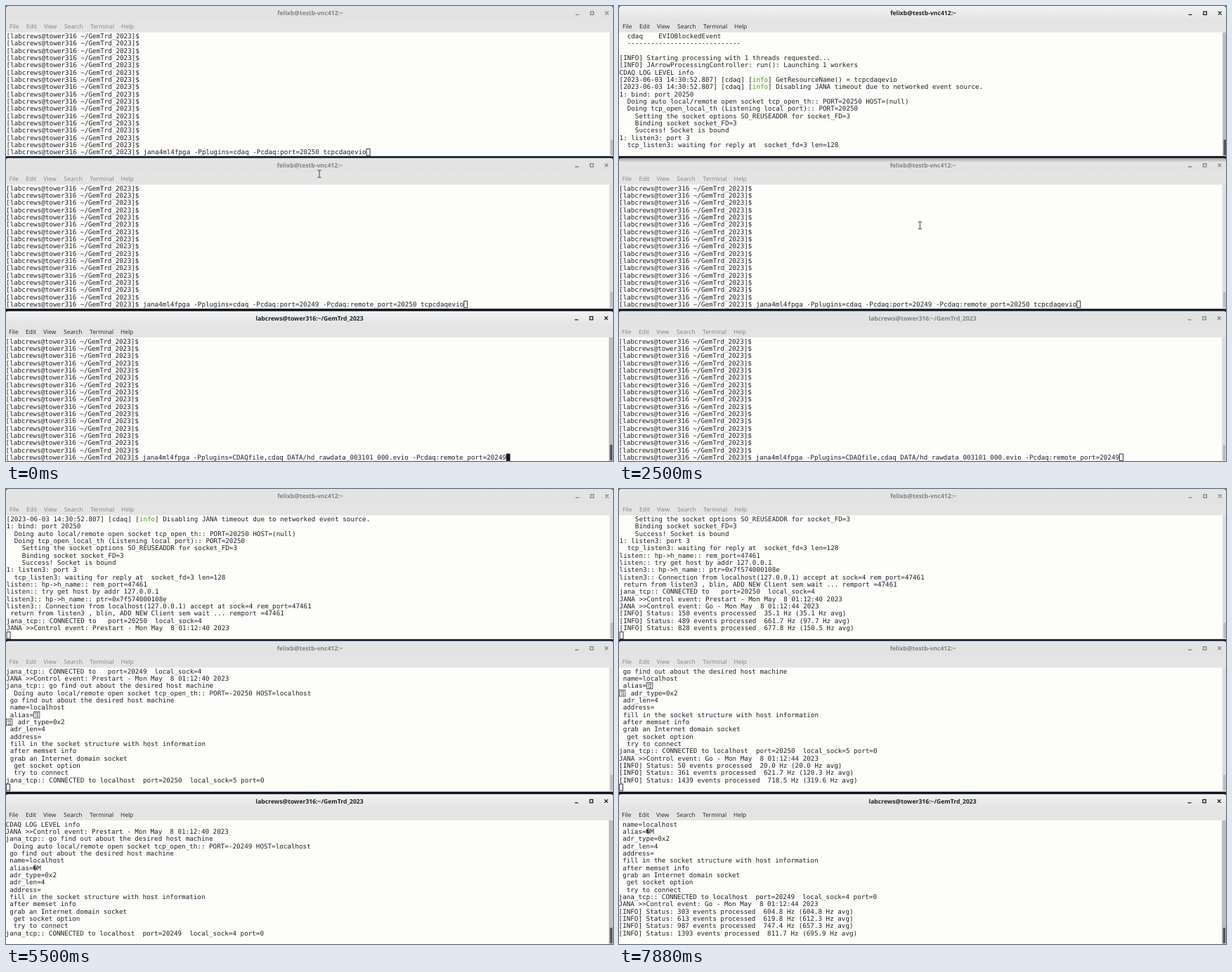
An HTML page with a canvas for the animation above (8 s loop, 864 px wide and 648 px high).

```html
<!DOCTYPE html>
<html lang="en">
<head>
<meta charset="utf-8">
<title>Three terminals</title>
<style>
html, body { margin: 0; width: 100%; height: 100%; overflow: hidden; background: #0b1826; }
canvas { display: block; }
</style>
</head>
<body>
<canvas id="stage" width="864" height="648"></canvas>
<script>
const ctx = document.getElementById('stage').getContext('2d');
const LOOP = 8000, STEP = 125;
const CELL_W = 5.566, CELL_H = 10.336, ROWS = 17;
const MONO = '9.245px "DejaVu Sans Mono", monospace';
const TITLE = 'bold 8.6px "Open Sans", sans-serif';
const MENU = '8.4px "Open Sans", sans-serif';
const HEX_BOX = '\u0001';
const PROMPT = '[labcrews@tower316 ~/GemTrd_2023]$';
const MENU_ITEMS = [['File', 5], ['Edit', 29], ['View', 54], ['Search', 83], ['Terminal', 120], ['Help', 164]];

const control = (name, time) => `JANA >>Control event: ${name} - Mon May  8 ${time} 2023`;
const PRESTART = control('Prestart', '01:12:40');
const GO = control('Go', '01:12:44');
const status = (events, rate, avg) => `[INFO] Status: ${events} events processed  ${rate} Hz (${avg} Hz avg)`;

const startup = () => [
  '  cdaq    EVIOBlockedEvent',
  '  ' + '-'.repeat(29),
  '',
  '[INFO] Starting processing with 1 threads requested...',
  '[INFO] JArrowProcessingController: run(): Launching 1 workers',
  'CDAQ LOG LEVEL info'
];

const listening = (port, clock) => [
  ...startup(),
  `[2023-06-03 ${clock}] [cdaq] [info] GetResourceName() = tcpcdaqevio`,
  `[2023-06-03 ${clock}] [cdaq] [info] Disabling JANA timeout due to networked event source.`,
  `1: bind: port ${port}`,
  `  Doing auto local/remote open socket tcp_open_th:: PORT=${port} HOST=(null)`,
  `  Doing tcp_open_local_th (Listening local port):: PORT=${port}`,
  '    Setting the socket options SO_REUSEADDR for socket_FD=3',
  '    Binding socket socket_FD=3',
  '    Success! Socket is bound',
  '1: listen3: port 3',
  '  tcp_listen3: waiting for reply at  socket_fd=3 len=128'
];

const accepted = port => [
  'listen:: hp->h_name:: rem_port=47461',
  'listen:: try get host by addr 127.0.0.1',
  'listen3:: hp->h_name:: ptr=0x7f574000108e',
  'listen3:: Connection from localhost(127.0.0.1) accept at sock=4 rem_port=47461',
  ' return from listen3 , blin, ADD NEW Client sem wait ... remport =47461',
  `jana_tcp:: CONNECTED to   port=${port}  local_sock=4`,
  PRESTART
];

const connected = (port, sock, alias, type) => [
  'jana_tcp:: go find out about the desired host machine',
  `  Doing auto local/remote open socket tcp_open_th:: PORT=-${port} HOST=localhost`,
  ' go find out about the desired host machine',
  ' name=localhost',
  ' alias=' + alias,
  type + 'adr_type=0x2',
  ' adr_len=4',
  ' address=',
  ' fill in the socket structure with host information',
  ' after memset info',
  ' grab an Internet domain socket',
  '  get socket option',
  '  try to connect',
  `jana_tcp:: CONNECTED to localhost  port=${port}  local_sock=${sock} port=0`
];

const terminals = [
  {
    x: 0.6, y: 0, bottom: 213.8, title: 'felixb@testb-vnc412:~',
    command: 'jana4ml4fpga -Pplugins=cdaq -Pcdaq:port=20250 tcpcdaqevio',
    enter: 1375,
    output: [
      [1625, listening(20250, '14:30:52.807')],
      [5250, accepted(20250)],
      [5625, [GO]],
      [5750, [status(158, '35.1', '35.1')]],
      [6250, [status(489, '661.7', '97.7')]],
      [6750, [status(828, '677.8', '150.5')]]
    ]
  },
  {
    x: 0.1, y: 216.6, bottom: 431.2, title: 'felixb@testb-vnc412:~',
    command: 'jana4ml4fpga -Pplugins=cdaq -Pcdaq:port=20249 -Pcdaq:remote_port=20250 tcpcdaqevio',
    enter: 3250,
    output: [
      [3500, listening(20249, '14:30:54.620')],
      [5250, [...accepted(20249), ...connected(20250, 5, HEX_BOX, HEX_BOX + '  ')]],
      [5625, [GO]],
      [5750, [status(50, '20.0', '20.0')]],
      [6250, [status(361, '621.7', '120.3')]],
      [7750, [status(1439, '718.5', '319.6')]]
    ]
  },
  {
    x: -0.4, y: 434.4, bottom: 648, title: 'labcrews@tower316:~/GemTrd_2023',
    command: 'jana4ml4fpga -Pplugins=CDAQfile,cdaq DATA/hd_rawdata_003101_000.evio -Pcdaq:remote_port=20249',
    enter: 4560,
    output: [
      [4875, startup()],
      [5125, [PRESTART, ...connected(20249, 4, '\uFFFDM', ' ')]],
      [5625, [GO]],
      [6250, [status(303, '604.8', '604.8')]],
      [6750, [status(613, '619.8', '612.3')]],
      [7250, [status(987, '747.4', '657.3')]],
      [7750, [status(1393, '811.7', '695.9')]]
    ]
  }
];

// [start time, terminal with the keyboard focus]
const FOCUS = [[0, 2], [875, 0], [2750, 1], [4125, 2]];

// Pointer trips: start, end, hidden from, from x/y, to x/y
const TRIPS = [
  [0, 750, 1375, 446, 239, 432, 118],
  [2000, 2625, 3250, 432, 118, 428, 335],
  [3625, 4250, 4500, 428, 335, 421, 540]
];

function visibleLines(term, time) {
  const lines = Array(ROWS - 1).fill(PROMPT);
  lines.push(PROMPT + ' ' + term.command);
  if (time >= term.enter) {
    for (const [at, text] of term.output) if (time >= at) lines.push(...text);
    lines.push('');
  }
  return lines.slice(-ROWS);
}

function drawHexBox(x, y) {
  ctx.lineWidth = 0.8;
  ctx.strokeStyle = '#33333c';
  ctx.strokeRect(x + 0.4, y + 0.7, 8.4, 9);
  ctx.font = '4.5px "DejaVu Sans Mono", monospace';
  ctx.fillText('00', x + 1.9, y + 4.8);
  ctx.fillText('18', x + 1.9, y + 8.9);
  ctx.font = MONO;
}

function drawLine(text, x, y) {
  const info = text.indexOf('[info]');
  for (let col = 0; col < text.length; col++) {
    const ch = text[col], cx = x + col * CELL_W;
    if (ch === ' ') continue;
    ctx.fillStyle = info >= 0 && col > info && col < info + 5 ? '#4e9a18' : '#20202a';
    if (ch === HEX_BOX) drawHexBox(cx, y);
    else ctx.fillText(ch, cx, y + 8.3);
  }
}

function drawButtons(x, y, color) {
  ctx.strokeStyle = color;
  ctx.lineWidth = 1.3;
  ctx.beginPath();
  ctx.moveTo(x + 810, y + 12.4);
  ctx.lineTo(x + 815, y + 12.4);
  ctx.moveTo(x + 852.3, y + 7.8);
  ctx.lineTo(x + 857, y + 12.5);
  ctx.moveTo(x + 857, y + 7.8);
  ctx.lineTo(x + 852.3, y + 12.5);
  ctx.stroke();
  ctx.strokeRect(x + 831.4, y + 8, 4.4, 4.4);
}

function drawFrame(term, active) {
  const { x, y, bottom } = term;
  const bar = ctx.createLinearGradient(0, y, 0, y + 20);
  bar.addColorStop(0, active ? '#f2f2f2' : '#e4e4e4');
  bar.addColorStop(1, active ? '#e4e4e4' : '#e2e2e2');
  ctx.fillStyle = bar;
  ctx.beginPath();
  ctx.roundRect(0, y, 864, 21, [3, 3, 0, 0]);
  ctx.fill();
  ctx.fillStyle = '#e4e4e4';
  ctx.fillRect(0, y + 20, 864, 18);
  ctx.fillStyle = '#fdfdfa';
  ctx.fillRect(0, y + 37.5, 864, bottom - y - 37.5);

  const ink = active ? '#1c2024' : '#808386';
  ctx.fillStyle = ink;
  ctx.font = TITLE;
  ctx.textAlign = 'center';
  ctx.fillText(term.title, x + 432.5, y + 13.2);
  ctx.textAlign = 'left';
  ctx.font = MENU;
  for (const [label, left] of MENU_ITEMS) ctx.fillText(label, x + left - 0.5, y + 32.1);
  drawButtons(x, y, ink);

  ctx.fillStyle = active ? '#bdbdbd' : '#dedede';
  ctx.fillRect(x + 858.5, y + 37.5, 6, bottom - y - 37.5);
  ctx.fillStyle = active ? '#50545a' : '#bcbcbc';
  ctx.fillRect(x + 860, y + 190.5, 3.5, 22);
}

function drawTerminal(term, time, focused, focusTime) {
  drawFrame(term, focused);
  ctx.font = MONO;
  const top = term.y + 37.8;
  const lines = visibleLines(term, time);
  lines.forEach((text, row) => drawLine(text, term.x, top + row * CELL_H));

  const x = term.x + lines[ROWS - 1].length * CELL_W;
  const y = top + (ROWS - 1) * CELL_H;
  if (!focused) {
    ctx.strokeStyle = '#20202a';
    ctx.lineWidth = 0.9;
    ctx.strokeRect(x + 0.5, y + 0.4, CELL_W - 0.6, CELL_H - 0.8);
    return;
  }
  const blinkStart = time >= term.enter ? term.enter : focusTime;
  if ((time - blinkStart) % 1200 < 600) {
    ctx.fillStyle = '#15151c';
    ctx.fillRect(x, y, CELL_W, CELL_H);
  }
}

// Shadow of the focused window on its neighbours, fading from one edge
function drawShadow(edge, reach) {
  const shade = ctx.createLinearGradient(0, edge, 0, edge + reach);
  shade.addColorStop(0, 'rgba(0, 0, 0, 0.4)');
  shade.addColorStop(1, 'rgba(0, 0, 0, 0)');
  ctx.fillStyle = shade;
  ctx.fillRect(0, edge, 864, reach);
}

function drawPointer(time) {
  const trip = TRIPS.find(([start, , hide]) => time >= start && time < hide);
  if (!trip) return;
  const [start, end, , x0, y0, x1, y1] = trip;
  const p = Math.min(1, (time - start) / (end - start));
  const ease = p * p * (3 - 2 * p);
  const x = x0 + (x1 - x0) * ease, y = y0 + (y1 - y0) * ease;
  ctx.strokeStyle = '#44444c';
  ctx.lineWidth = 1;
  ctx.beginPath();
  ctx.moveTo(x, y - 4.5);
  ctx.lineTo(x, y + 4.5);
  for (const side of [-5, 5]) {
    ctx.moveTo(x - 2.7, y + side);
    ctx.lineTo(x + 2.7, y + side);
  }
  ctx.stroke();
}

function draw(time) {
  ctx.textRendering = 'geometricPrecision';
  ctx.fillStyle = '#0b1826';
  ctx.fillRect(0, 0, 864, 648);
  const [focusTime, focus] = FOCUS.filter(([at]) => time >= at).pop();
  terminals.forEach((term, i) => drawTerminal(term, time, i === focus, focusTime));
  drawShadow(terminals[focus].bottom, 9);
  drawShadow(terminals[focus].y, -5);
  drawPointer(time);
}

const begin = performance.now();
let shown = -1;
function tick() {
  const elapsed = (performance.now() - begin) % LOOP;
  const time = Math.floor(elapsed / STEP) * STEP;
  if (time !== shown) draw(shown = time);
  requestAnimationFrame(tick);
}
tick();
</script>
</body>
</html>
```
